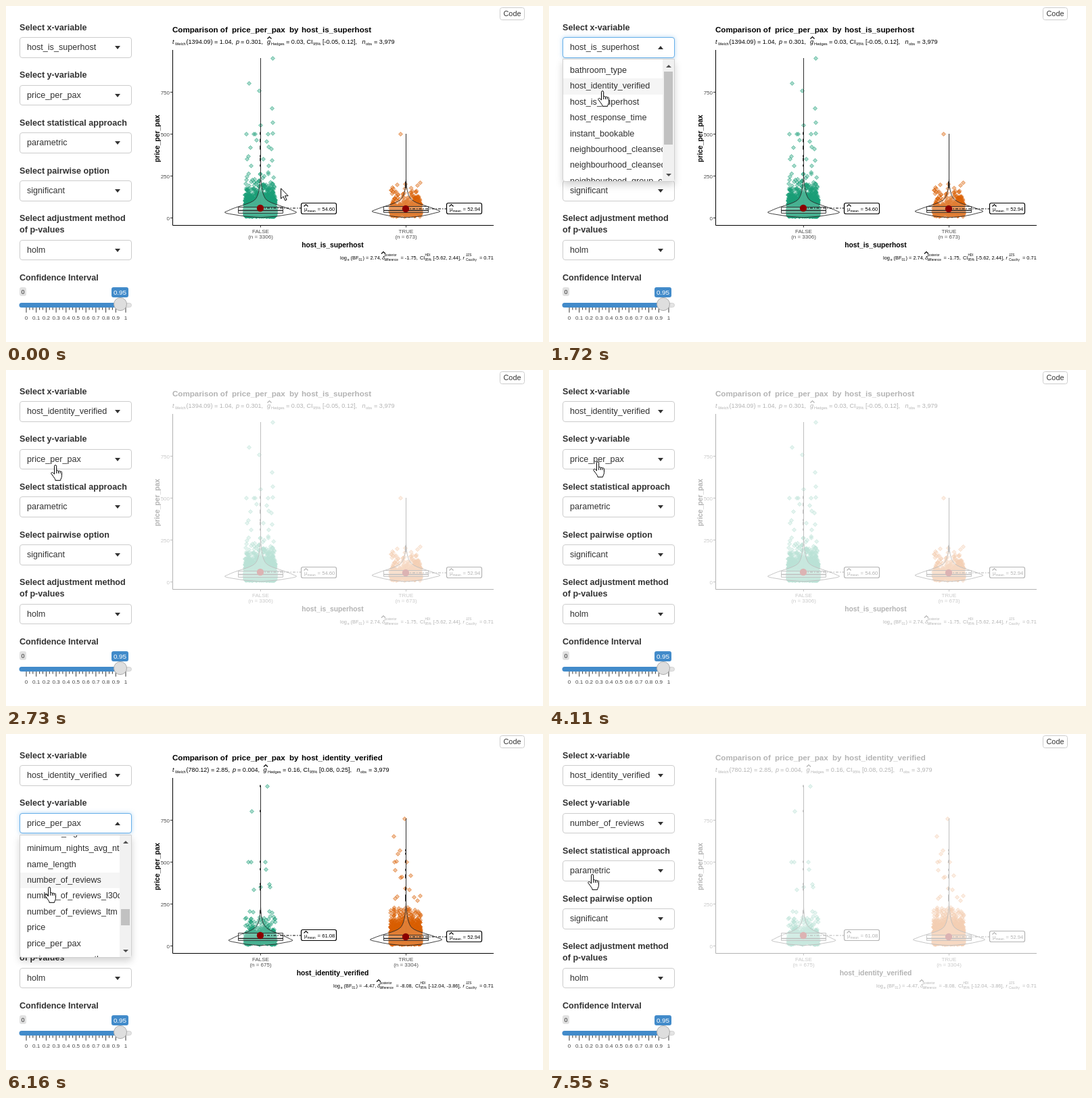
An HTML page with a canvas that plays this animation: 794 px wide and 497 px high, repeating every 8 s.

```html
<!DOCTYPE html>
<html lang="en">
<head>
<meta charset="utf-8">
<title>Group comparison dashboard</title>
<style>
html, body { margin: 0; width: 100%; height: 100%; overflow: hidden; background: #fff; }
body { position: relative; font: 12.6px "Liberation Sans", Arial, sans-serif; color: #333; }
body *, svg { position: absolute; box-sizing: border-box; }
svg text { white-space: pre; }
.full { left: 0; top: 0; width: 794px; height: 497px; }
.label { left: 20px; font-weight: bold; line-height: 17px; white-space: pre; }
.box { left: 20px; width: 166px; height: 30.6px; border: 1px solid #ccc; border-radius: 4px; background: #fff; }
.box b { left: 10px; line-height: 29px; font-weight: normal; white-space: pre; }
.box i { left: 140px; top: 12px; border: 4.5px solid transparent; border-top: 5px solid #333; border-bottom: 0; }
.open .box { border-color: #66afe9; box-shadow: 0 0 6px rgba(102,175,233,.5); }
.open .box i { border-top: 0; border-bottom: 5px solid #333; }
.menu { left: 20px; width: 166px; height: 182px; border: 1px solid #d0d0d0; border-radius: 0 0 4px 4px; background: #fff; box-shadow: 0 5px 11px rgba(0,0,0,.175); }
.list { left: 0; top: 0; width: 147px; height: 180px; overflow: hidden; }
.row { left: 10px; line-height: 23.4px; color: #303030; white-space: pre; }
.hover { left: 0; width: 147px; height: 23.4px; background: #f5f5f5; }
.bar { left: 147px; top: 0; width: 17px; height: 180px; background: #f1f1f1; }
.bar u { left: 2px; width: 13px; background: #c1c1c1; }
.bar i { left: 5px; border: 4px solid transparent; }
.bar .up { top: 8px; border-top: 0; border-bottom: 4px solid #505050; }
.bar .dn { top: 169px; border-bottom: 0; border-top: 4px solid #505050; }

/* Every change is a hard step on one 8 s clock. */
.anim { animation: 8s step-end infinite; }
#menuX { animation-name: menuX; }
#menuY { animation-name: menuY; }
#menuX .hover { animation-name: hoverX; }
#menuY .hover { animation-name: hoverY; }
.x-old { animation-name: xOld; } .x-new { animation-name: xNew; }
.y-old { animation-name: yOld; } .y-new { animation-name: yNew; }
#plotA { animation-name: plotA; }
#plotB { animation-name: plotB; }
#cursor { left: 0; top: 0; animation-name: move; }
#cursor svg { left: -1px; top: 0; }
#arrow { animation-name: arrow; }
#hand { animation-name: hand; }
@keyframes menuX { 0%, 25.625% { visibility: hidden } 12.75% { visibility: visible } }
@keyframes menuY { 0%, 81.375% { visibility: hidden } 68.5% { visibility: visible } }
@keyframes hoverX { 0% { top: 51.8px } 17.125%, 100% { top: 28.4px } }
@keyframes hoverY { 0% { top: 148.6px } 72.875% { top: 31.6px } 77%, 100% { top: 55px } }
@keyframes xOld { 0% { opacity: 1 } 25.625%, 100% { opacity: 0 } }
@keyframes xNew { 0% { opacity: 0 } 25.625%, 100% { opacity: 1 } }
@keyframes yOld { 0% { opacity: 1 } 81.375%, 100% { opacity: 0 } }
@keyframes yNew { 0% { opacity: 0 } 81.375%, 100% { opacity: 1 } }
@keyframes plotA { 0% { opacity: 1 } 34.125% { opacity: .3 } 60%, 100% { opacity: 0 } }
@keyframes plotB { 0% { opacity: 0 } 60% { opacity: 1 } 89.875% { opacity: .5 } 94.375%, 100% { opacity: .3 } }
@keyframes arrow {
  0%, 8.5%, 25.625%, 81.375% { opacity: 1 }
  4.125%, 12.75%, 30%, 89.875%, 100% { opacity: 0 }
}
@keyframes hand {
  0%, 8.5%, 25.625%, 81.375% { opacity: 0 }
  4.125%, 12.75%, 30%, 89.875%, 100% { opacity: 1 }
}
@keyframes move {
  0% { transform: translate(407px, 269px) }
  4.125% { transform: translate(85px, 58px) }
  8.5% { transform: translate(75px, 43px) }
  12.75% { transform: translate(74px, 48px) }
  17.125% { transform: translate(71px, 111px) }
  21.5% { transform: translate(73px, 125px) }
  25.625% { transform: translate(78px, 125px) }
  30% { transform: translate(71px, 142px) }
  34.125% { transform: translate(67px, 140px) }
  38.5% { transform: translate(66px, 137px) }
  42.875% { transform: translate(66px, 136px) }
  51.375% { transform: translate(66px, 135px) }
  68.5% { transform: translate(66px, 125px) }
  72.875% { transform: translate(62px, 188px) }
  77% { transform: translate(58px, 226px) }
  81.375% { transform: translate(62px, 225px) }
  89.875% { transform: translate(58px, 213px) }
  94.375%, 100% { transform: translate(58px, 207px) }
}
</style>
</head>
<body>
<div id="plotA" class="full anim"></div>
<div id="plotB" class="full anim"></div>
<div id="panel" class="full"></div>
<div id="cursor" class="anim">
  <svg id="arrow" class="anim" width="14" height="22">
    <path d="M.5 .8V16L4.1 12.7 6.6 18.6 9 17.6 6.5 11.8H11.2Z" fill="#fff" stroke="#000"/>
  </svg>
  <svg id="hand" class="anim" width="18" height="25">
    <path d="M5.5 14V2.3a1.6 1.6 0 0 1 3.2 0V9.4a1.5 1.5 0 0 1 2.8.5 1.4 1.4 0 0 1 2.6.7 1.3 1.3 0 0 1 2.4.9V16.5c0 3-1.5 4-2 6.8H7c0-2.5-2-3.8-3-5.8L1 13.5c-.8-1.6 1.2-2.7 2.4-1.5z" fill="#fff" stroke="#000"/>
    <path d="M8.7 9.5V13M11.5 10V13M14.1 10.7V13" stroke="#000" fill="none"/>
  </svg>
</div>
<script>
const GREEN = '#1b9e77', ORANGE = '#d95f02';
const $ = id => document.getElementById(id);
const yOf = v => 313.5 - v * 0.248;

// ---- sidebar ----
const label = (y, s) => `<div class="label" style="top:${y}px">${s}</div>`;
const box = (y, ...values) =>
  `<div class="box" style="top:${y}px">${values.map(([s, c = '']) => `<b class="${c}">${s}</b>`).join('')}<i></i></div>`;

function menu(id, y, value, first, thumb, rows) {
  const items = rows.map((s, i) => `<div class="row" style="top:${first + i * 23.4}px">${s}</div>`).join('');
  return `<div id="${id}" class="open full anim">${box(y, [value])}
    <div class="menu" style="top:${Math.round(y) + 32}px">
      <div class="list"><div class="hover anim"></div>${items}</div>
      <div class="bar"><i class="up"></i><u style="top:${thumb[0]}px;height:${thumb[1]}px"></u><i class="dn"></i></div>
    </div></div>`;
}

function slider() {
  let s = '';
  for (let i = 0; i <= 30; i++) {
    const x = 30 + i * 4.9, major = i % 3 === 0;
    s += `<path d="M${x} 446v${major ? 7.5 : 3.5}" stroke="#222" stroke-width=".9"/>`;
    if (major) s += `<text x="${x}" y="464" font-size="8.1" text-anchor="middle" fill="#444">${i / 30}</text>`;
  }
  return `<svg class="full" width="794" height="497">
    <rect x="20.5" y="439.5" width="165" height="6" rx="3" fill="#e4e4e4" stroke="#d2d2d2"/>
    <path d="M23 439H169V446H23a3.5 3.5 0 0 1 0-7z" fill="#428bca"/>${s}
    <circle cx="169" cy="441" r="9.5" fill="#dedede" stroke="#ababab"/>
    <rect x="20" y="416" width="10" height="13" rx="3" fill="#e1e1e1"/>
    <text x="25" y="425.5" font-size="9" text-anchor="middle" fill="#333">0</text>
    <rect x="156" y="416" width="25" height="15" rx="3" fill="#428bca"/>
    <text x="168.5" y="427" font-size="9.9" text-anchor="middle" fill="#fff">0.95</text>
    <rect x="730.5" y="2.5" width="36" height="18" rx="3" fill="#fff" stroke="#ccc"/>
    <text x="748.5" y="15" font-size="10.9" text-anchor="middle" fill="#333">Code</text></svg>`;
}

$('panel').innerHTML =
  label(24, 'Select x-variable') +
  box(46.4, ['host_is_superhost', 'anim x-old'], ['host_identity_verified', 'anim x-new']) +
  label(94, 'Select y-variable') +
  box(116.6, ['price_per_pax', 'anim y-old'], ['number_of_reviews', 'anim y-new']) +
  label(165, 'Select statistical approach') + box(187.2, ['parametric']) +
  label(236, 'Select pairwise option') + box(258, ['significant']) +
  label(306, 'Select adjustment method\nof p-values') + box(345.6, ['holm']) +
  label(394, 'Confidence Interval') + slider() +
  menu('menuX', 46.4, 'host_is_superhost', 5, [18, 108],
    ['bathroom_type', 'host_identity_verified', 'host_is_superhost', 'host_response_time', 'instant_bookable',
     'neighbourhood_cleansed', 'neighbourhood_cleansed', 'neighbourhood_group_cleansed']) +
  menu('menuY', 116.6, 'price_per_pax', -15.2, [109, 24],
    ['minimum_nights', 'minimum_nights_avg_ntm', 'name_length', 'number_of_reviews', 'number_of_reviews_l30d',
     'number_of_reviews_ltm', 'price', 'price_per_pax', 'reviews_per_month']);

// ---- plots ----
function seeded(a) {
  return () => {
    a = (a + 0x6d2b79f5) | 0;
    let t = Math.imul(a ^ (a >>> 15), 1 | a);
    t = (t + Math.imul(t ^ (t >>> 7), 61 | t)) ^ t;
    return ((t ^ (t >>> 14)) >>> 0) / 4294967296;
  };
}

function dots(ctx, g) {
  const rnd = seeded(g.n);
  const dot = (x, y) => {
    ctx.beginPath();
    ctx.moveTo(x, y - 3); ctx.lineTo(x + 3, y); ctx.lineTo(x, y + 3); ctx.lineTo(x - 3, y);
    ctx.closePath();
    ctx.globalAlpha = .4; ctx.fill();
    ctx.globalAlpha = .55; ctx.stroke();
  };
  ctx.fillStyle = ctx.strokeStyle = g.color;
  for (let i = 0; i < g.n; i++) {
    const z = Math.sqrt(-2 * Math.log(1 - rnd())) * Math.cos(6.2832 * rnd());
    const v = 46 * Math.exp(z * g.spread), x = g.x + (rnd() - .5) * 45;
    if (v < g.cap) dot(x, Math.min(yOf(v), 311.5));
  }
  for (let i = 0; i < g.far.length; i += 2) dot(g.far[i] + .5, g.far[i + 1] + .5);
}

const text = (x, y, size, s, extra = '') => `<text x="${x}" y="${y}" font-size="${size}" ${extra}>${s}</text>`;
const hat = (x, y) => `<path d="M${x - 3} ${y + 3}l3-3 3 3" fill="none" stroke="#000" stroke-width="1.2"/>`;

// Parts are [x, kind, text]; kinds: n normal, i italic, s subscript, u superscript.
const formula = (y, size, parts) => parts.map(([x, k, s]) =>
  text(x, y + (k === 's' ? 2.5 : k === 'u' ? -4.5 : 0), 'su'.includes(k) ? size * .63 : size, s,
    k === 'i' ? 'font-style="italic"' : '')).join('');

function group(g) {
  const c = g.x + .5, w = g.half, m = g.mid;
  const side = s => `M${c} ${g.top}V${g.tail}C${c + s} ${g.tail + 18} ${c + s * 3} 282 ${c + s * 9} 287
    C${c + s * 16} 293 ${c + s * w * .65} 296 ${c + s * w * .92} ${m - 1.5}
    Q${c + s * (w + 4)} ${m + .5} ${c + s * w * .85} ${m + 2.5}Q${c + s * w * .45} 312 ${c} 312.8`;
  let marks = '';
  for (let i = 1; i < g.far.length; i += 2)
    if (g.far[i] > g.dashFrom) marks += `M${c - .5} ${g.far[i] - 1.5}v3`;
  const y = g.mean, bx = g.x + 60.5, by = g.boxY + .5;
  return `<g fill="#fff" fill-opacity=".2" stroke="#2b2b2b" stroke-width=".9">
      <path d="${side(-1)}"/><path d="${side(1)}"/>
      <path d="M${c - 33} ${g.q3}h66V${g.q1}h-66Z"/><path d="M${c - 33} 302.5h66" stroke-width="1.4"/></g>
    <path d="${marks}" stroke="#111" stroke-width="1.6"/>
    <path d="M${c} ${y}H${bx}" stroke="#000" stroke-dasharray="4 2 1.5 2"/>
    <circle cx="${g.x}" cy="${y}" r="5.2" fill="#8b0000"/>
    <rect x="${bx}" y="${by}" width="52" height="16" rx="2.5" fill="#fff" stroke="#000" stroke-width="1.2"/>
    ${hat(bx + 7, by + 2)}
    ${formula(by + 11, 7.7, [[bx + 4.5, 'n', 'μ'], [bx + 9, 's', 'mean'], [bx + 24, 'n', '= ' + g.value]])}
    <path d="M${c} 324.5v3" stroke="#333"/>
    ${text(c, 336, 8, g.name, 'text-anchor="middle" fill="#4d4d4d"')}
    ${text(c, 344, 8, `(n = ${g.n})`, 'text-anchor="middle" fill="#4d4d4d"')}`;
}

function plot(id, p) {
  const ticks = [0, 250, 500, 750].map(v => {
    const y = Math.round(yOf(v)) - .5;
    return `<path d="M243 ${y}h3.5" stroke="#333"/>` + text(242, y + 3, 8, v, 'text-anchor="end" fill="#4d4d4d"');
  }).join('');
  const bold = 'font-weight="bold"';
  $(id).innerHTML = `<canvas class="full" width="794" height="497"></canvas>
    <svg class="full" width="794" height="497">
    ${text(246, 39, 11.6, 'Comparison of', bold)}${text(334, 39, 11.6, 'price_per_pax', bold)}
    ${text(419, 39, 11.6, 'by', bold)}${text(437, 39, 11.6, p.x, bold)}
    ${formula(55.5, 9.1, p.stats)}${hat(p.gHat, 45.5)}
    <path d="M246.5 65V324.5H721" fill="none" stroke="#000"/>${ticks}
    ${text(0, 0, 10.3, 'price_per_pax', bold + ' text-anchor="middle" transform="translate(227 196) rotate(-90)"')}
    ${text(483, 357, 10.3, p.x, bold + ' text-anchor="middle"')}
    ${p.groups.map(group).join('')}
    ${formula(374.5, 7.4, p.bayes)}${hat(p.dHat, 363.5)}</svg>`;
  const ctx = $(id).firstChild.getContext('2d');
  p.groups.forEach(g => dots(ctx, g));
}

const statParts = (df, p, g, ci, a, b, c) => [
  [246, 'i', 't'], [250, 's', 'Welch'], [266.5, 'n', df], [340 - a, 'i', 'p'], [347 - a, 'n', p],
  [386 - b, 'i', 'g'], [392 - a, 's', 'Hedges'], [414 - a, 'n', g], [444.5 - a, 'n', 'CI'], [454 - a, 's', '95%'],
  [468 - a, 'n', ci], [526.5 - c, 'i', 'n'], [532 - c, 's', 'obs'], [544 - c, 'n', '= 3,979']];

const bayesParts = (bf, diff, ci, a, b, c) => [
  [494 - a, 'n', 'log'], [505 - a, 's', 'e'], [509.5 - a, 'n', '(BF'], [521.5 - a, 's', '01'], [527.5 - a, 'n', ') ' + bf],
  [556 - b, 'i', 'δ'], [559.5 - b, 'u', 'posterior'], [559.5 - b, 's', 'difference'], [583.5 - b, 'n', diff],
  [612 - c, 'n', 'CI'], [619.5 - c, 'u', 'HDI'], [619.5 - c, 's', '95%'], [631.5 - c, 'n', ci],
  [675.5, 'i', 'r'], [680, 'u', 'JZS'], [680, 's', 'Cauchy'], [700, 'n', '= 0.71']];

plot('plotA', {
  x: 'host_is_superhost', gHat: 389.5, dHat: 558,
  stats: statParts('(1394.09) = 1.04,', '= 0.301,', '= 0.03,', '[-0.05, 0.12],', 0, 0, 0),
  bayes: bayesParts('= 2.74,', '= -1.75,', '[-5.62, 2.44],', 0, 0, 0),
  groups: [
    { name: 'FALSE', n: 3306, color: GREEN, x: 376, spread: .66, cap: 280, half: 54, mid: 305, top: 77, tail: 250,
      q3: 297.5, q1: 306.5, mean: 299, boxY: 291, value: '54.60', dashFrom: 180,
      far: [394, 77, 359, 114, 374, 125, 393, 151, 394, 172, 376, 176, 355, 189, 366, 189, 368, 189, 387, 189, 394, 188,
        370, 198, 385, 200, 361, 209, 388, 208, 392, 211, 356, 226, 358, 222, 380, 226, 393, 228, 362, 236, 388, 236] },
    { name: 'TRUE', n: 673, color: ORANGE, x: 591, spread: .6, cap: 180, half: 51, mid: 303.5, top: 189, tail: 256,
      q3: 296.5, q1: 305.5, mean: 300, boxY: 291, value: '52.94', dashFrom: 200,
      far: [583, 189, 612, 261, 608, 265, 578, 264, 571, 268, 590, 263] }
  ]
});

plot('plotB', {
  x: 'host_identity_verified', gHat: 384, dHat: 551,
  stats: statParts('(780.12) = 2.85,', '= 0.004,', '= 0.16,', '[0.08, 0.25],', 5, 5.5, 8),
  bayes: bayesParts('= -4.47,', '= -8.08,', '[-12.04, -3.86],', 10, 7, 7),
  groups: [
    { name: 'FALSE', n: 675, color: GREEN, x: 376, spread: .66, cap: 180, half: 48, mid: 305, top: 77, tail: 256,
      q3: 294.5, q1: 305.5, mean: 298, boxY: 289, value: '61.08', dashFrom: 0,
      far: [386, 77, 363, 114, 358, 189, 362, 189, 383, 189, 384, 200, 389, 222, 390, 226, 366, 230, 376, 226,
        360, 262, 365, 263, 393, 264, 389, 262] },
    { name: 'TRUE', n: 3304, color: ORANGE, x: 591, spread: .64, cap: 240, half: 54, mid: 304, top: 125, tail: 250,
      q3: 297.5, q1: 305.5, mean: 300, boxY: 291, value: '52.94', dashFrom: 160,
      far: [589, 125, 573, 151, 582, 172, 579, 177, 574, 189, 577, 188, 592, 189, 575, 201, 583, 212, 585, 211,
        598, 209, 590, 228, 596, 230, 612, 239, 603, 241, 578, 240, 575, 243, 608, 246] }
  ]
});
</script>
</body>
</html>
```
